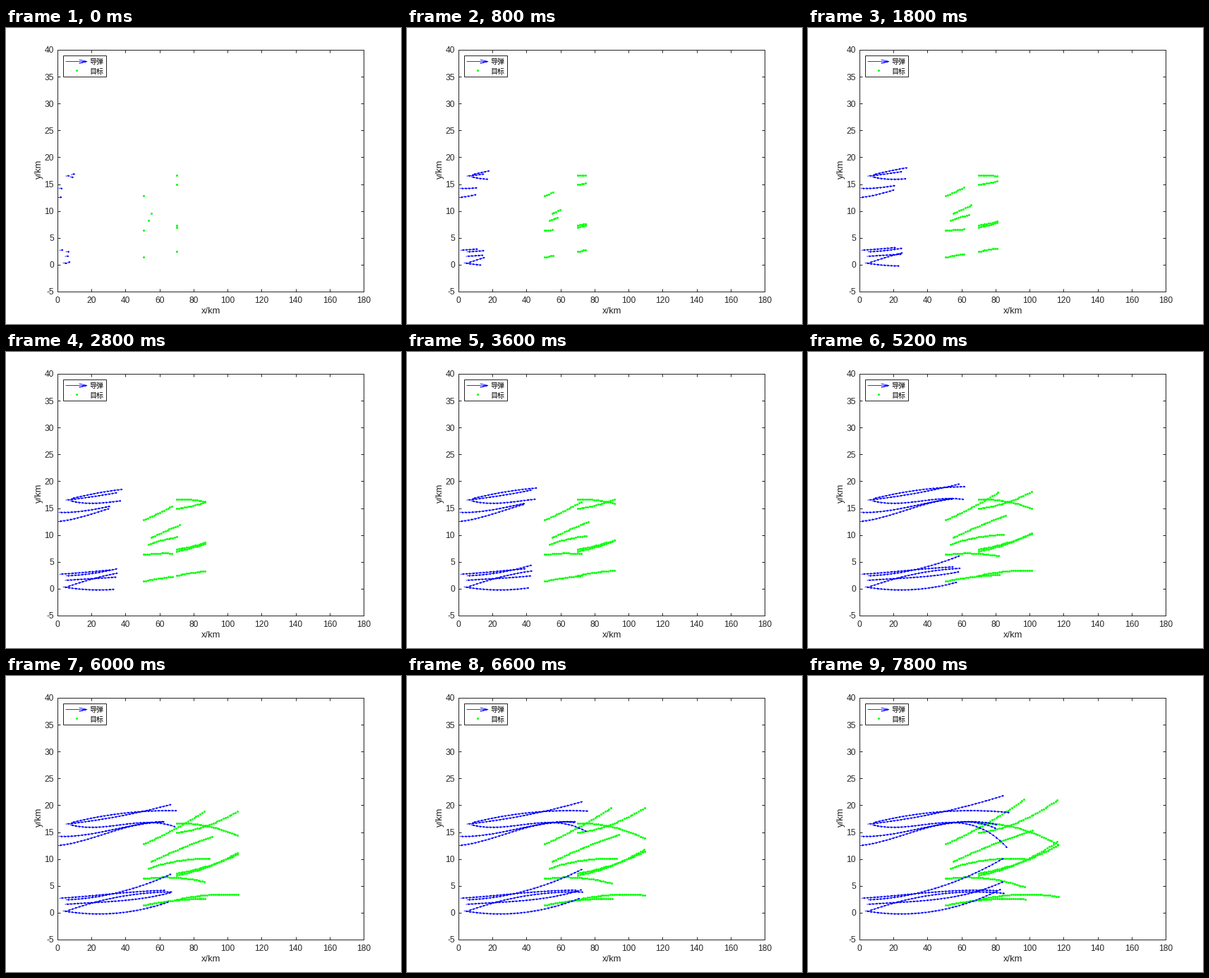
Recreate the animation shown at these times as a matplotlib script. Size 560 by 420 pixels, loop 8000 ms.

```python
import numpy as np
import matplotlib.pyplot as plt
from matplotlib.animation import FuncAnimation
from matplotlib.patches import Rectangle

W, H, DPI = 560, 420, 100
PX = 72 / DPI                      # one pixel in points
STEPS, STEP_MS = 40, 200
LEFT, RIGHT, TOP, BOTTOM = 73, 507, 31, 374
X_MAX, Y_MIN, Y_MAX = 180, -5, 40
MISSILE_SPEED, TARGET_SPEED = 2.0, 1.2      # km per step
INK, BLUE, GREEN = "#262626", "#0000ff", "#00ff00"


def to_px(x, y):
    px = LEFT + x * (RIGHT - LEFT) / X_MAX
    py = BOTTOM - (y - Y_MIN) * (BOTTOM - TOP) / (Y_MAX - Y_MIN)
    return np.stack([px, py], axis=-1)


def flight(speed, x, y, climb, turn, swing=0):
    """Pixel path flown at constant speed; the climb bends as time passes."""
    s = np.arange(STEPS + 1) / STEPS
    height = y + climb * s + turn * s ** 2 + swing * s ** 3
    dx = np.sqrt(speed ** 2 - np.diff(height) ** 2)
    return to_px(x + np.concatenate([[0], np.cumsum(dx)]), height)


def missile(*launch):
    return flight(MISSILE_SPEED, *launch)


def target(*launch):
    return flight(TARGET_SPEED, *launch)


def arrows(tails, tips, head, half):
    """Stroke of open-headed arrows, separated by NaN points."""
    d = tips - tails
    d = d / np.linalg.norm(d, axis=-1, keepdims=True)
    side = np.stack([-d[..., 1], d[..., 0]], axis=-1)
    back = tips - head * d
    parts = [tails, tips, back + half * side, tips, back - half * side,
             np.full_like(tips, np.nan)]
    return np.stack(parts, axis=-2).reshape(-1, 2)


# launch x, y, climb, turn and swing (km)
missiles = np.array([
    missile(8.1, 16.75, 6.3, -4.4),
    missile(4.9, 16.5, 2.7, 2.6),
    missile(7.3, 16.4, -6.9, 27.5, -24.9),
    missile(0.85, 14.2, -0.7, 14.2, -11.3),
    missile(0.4, 12.5, 2.8, 15.3, -14.9),
    missile(1.25, 2.7, 1.5, 2.6, -2.7),
    missile(5.0, 2.4, 1.0, 6.7),
    missile(4.5, 1.55, 2.0, -2.9, 5.1),
    missile(3.3, 0.35, -4.4, 8.4),
    missile(5.4, 0.3, 9.1, -5.8),
])
targets = np.array([
    target(50.7, 12.8, 6.7, 1.8),
    target(55.0, 9.5, 7.3, -1.4),
    target(53.4, 8.3, 5.0, -3.4),
    target(50.4, 6.35, 2.0, -3.7),
    target(50.8, 1.4, 3.2, -2.1),
    target(70, 16.7, 0.2, -4.4),
    target(70, 14.9, 2.0, 4.4),
    target(70, 7.35, 2.5, 2.9),
    target(70, 7.0, 2.7, 3.8),
    target(70, 2.45, 3.4, -2.9),
])

plt.rcParams["font.family"] = "Liberation Sans"
fig = plt.figure(figsize=(W / DPI, H / DPI), dpi=DPI, facecolor="white")

ax = fig.add_axes([LEFT / W, 1 - BOTTOM / H, (RIGHT - LEFT) / W, (BOTTOM - TOP) / H])
ax.set(xlim=(0, X_MAX), ylim=(Y_MIN, Y_MAX),
       xticks=range(0, X_MAX + 1, 20), yticks=range(Y_MIN, Y_MAX + 1, 5))
ax.set_yticklabels([str(v) for v in range(Y_MIN, Y_MAX + 1, 5)])
ax.tick_params(direction="in", top=True, right=True, length=4 * PX, width=PX,
               color=INK, labelcolor=INK, labelsize=12 * PX)
ax.tick_params(axis="x", pad=7.5 * PX)
ax.tick_params(axis="y", pad=5 * PX)
for spine in ax.spines.values():
    spine.set(linewidth=PX, color=INK)

# overlay in pixel units, y pointing down
stage = fig.add_axes([0, 0, 1, 1])
stage.set(xlim=(0, W), ylim=(H, 0))
stage.axis("off")
label_style = dict(size=13 * PX, color=INK, ha="center", va="center")
stage.text(291, 402, "x/km", **label_style)
stage.text(47, 200, "y/km", rotation=90, **label_style)

dot_style = dict(ls="none", marker="o", ms=3 * PX, mew=0, color=GREEN)
line_style = dict(lw=0.8 * PX, color=BLUE, solid_joinstyle="miter")

stage.add_patch(Rectangle((81, 39), 61, 30, fc="white", ec=INK, lw=PX))
key = arrows(np.array([[85.0, 47.5]]), np.array([[115.0, 47.5]]), 11, 2.5)
stage.plot(*key.T, **line_style)
stage.plot([99.5], [60], **dot_style)
for y, label in ((46.5, "导弹"), (60.5, "目标")):
    stage.text(118, y, label, size=10 * PX, color="black", va="center_baseline",
               family="Noto Sans CJK JP")

dots, = stage.plot([], [], zorder=3, **dot_style)
shafts, = stage.plot([], [], zorder=4, **line_style)


def draw(i):
    n = i + 1
    dots.set_data(*targets[:, :n].reshape(-1, 2).T)
    shafts.set_data(*arrows(missiles[:, :n], missiles[:, 1:n + 1], 1.8, 0.9).T)
    return dots, shafts


anim = FuncAnimation(fig, draw, frames=STEPS, interval=STEP_MS,
                     init_func=lambda: draw(0), repeat=True, repeat_delay=0)
plt.show()
```
